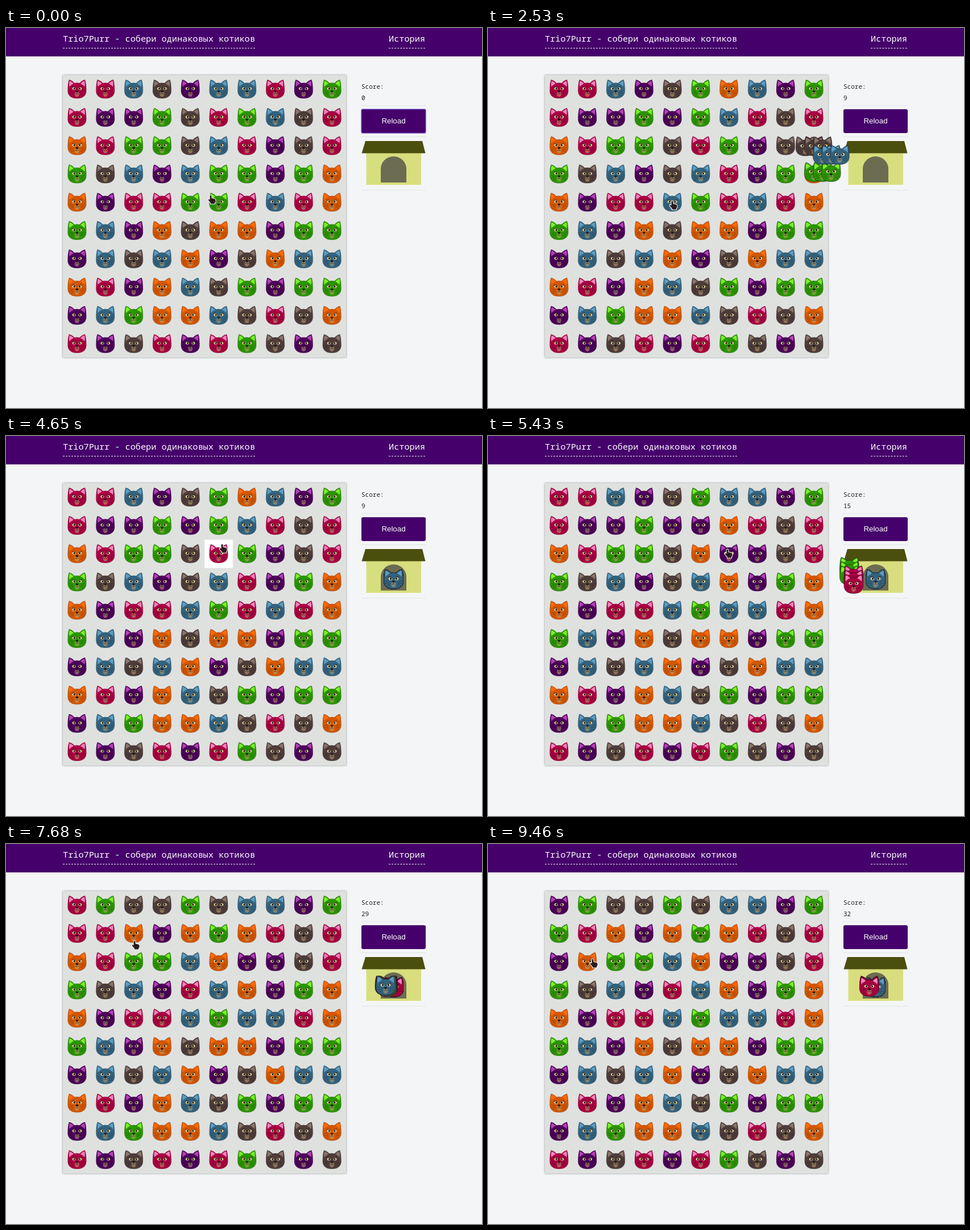
These frames come from a looping animation (837 by 669 pixels, 9560 ms). An HTML page with a canvas:

```html
<!DOCTYPE html>
<html lang="ru">
<head>
<meta charset="utf-8">
<title>Котики</title>
<style>
  html, body { margin: 0; width: 100%; height: 100%; overflow: hidden; background: #f4f5f7; }
  #stage { position: relative; width: 837px; height: 669px; overflow: hidden; }
  #stage > * { position: absolute; }
  .bar { left: 0; top: 0; width: 837px; height: 50px; background: #45006b; }
  .link { top: 8px; height: 27px; font: 15.23px/20px "Noto Sans Mono", monospace; color: #fff; white-space: pre; border-bottom: 1px dashed #fff; }
  .board { left: 100px; top: 83px; width: 498px; height: 497px; background: #dfe1df; box-shadow: 0 0 3px rgba(0, 0, 0, .45); }
  .score { left: 625px; top: 93px; font: 11px/20px "Noto Sans Mono", monospace; color: #222; }
  .rule { left: 625px; width: 113px; height: 1px; background: #e2e3e6; }
  .reload { left: 625px; top: 143px; width: 113px; height: 42px; border-radius: 3px; background: #45006b; color: #fff; font: 13.33px/42px "Liberation Sans", Arial, sans-serif; text-align: center; }
  .reload.focus { box-shadow: inset 0 0 0 1px #5a2c9c, 0 0 0 1px #9a86d8; }
  svg, canvas { left: 0; top: 0; }
</style>
</head>
<body>
<div id="stage">
  <div class="bar"></div>
  <div class="link" style="left:100px">Trio7Purr - собери одинаковых котиков</div>
  <div class="link" style="right:100px">История</div>
  <div class="board"></div>
  <div class="score">Score:<br><span id="score">0</span></div>
  <div class="rule" style="top:136px"></div>
  <div class="reload" id="reload">Reload</div>
  <div class="rule" style="top:191px"></div>
  <div class="rule" style="top:285px"></div>
  <svg width="837" height="669">
    <path fill="#d8de7d" d="M633.500 220H730V276H633.500Z"/>
    <path fill="#4b4f0d" d="M632 199H732L737.500 220.500H625.500Z"/>
    <path fill="#6c6c52" d="M659 272V248A22.500 22 0 0 1 704 248V272Z"/>
  </svg>
  <canvas id="view" width="837" height="669"></canvas>
</div>
<script>
const LOOP = 9560, FLIGHT = 490, CELL = 49.8;
const HOME = { x: 681.5, y: 252 };
const ctx = document.getElementById('view').getContext('2d');
const scoreEl = document.getElementById('score');
const reloadEl = document.getElementById('reload');

// fur and inner ear
const COATS = {
  R: ['#a80040', '#f283bd'], B: ['#33627d', '#5c9dc2'],
  K: ['#4d3c3a', '#887469'], P: ['#4b0058', '#b440b6'],
  G: ['#2b9404', '#7cf02a'], O: ['#d25603', '#ff6c08']
};

const START = [
  'RRBKPBBRPG', 'RPPGKRGBKR', 'ORGGKBRPKR', 'GKBPBGGPGO', 'OPRRGGRBRO',
  'GBPOKOOPGG', 'PBKBOPKOBB', 'ORPOBKGPGG', 'PBGOOBKRKO', 'RPKRPRGKPK'
];

// cols: new tops of columns; fly: coat, row, column of each matched cat
const MOVES = [
  { at: 2330, score: 9, cols: { 3: 'P', 4: 'KPKKB', 5: 'GGRB', 6: 'OBGR', 7: 'BR' },
    fly: 'G34 G35 G36 K03 K04 K05 B15 B16 B17' },
  { at: 5160, score: 15, cols: { 5: 'GPO', 6: 'BOPOB' },
    fly: 'G05 G15 G25 R26 R36 R46' },
  { at: 7300, score: 29, cols: { 1: 'GR', 2: 'KO', 3: 'KP', 4: 'GOBR', 5: 'KG' },
    fly: 'P11 P12 P13 P14 P15 K14 K24 K34 G13 B12' },
  { at: 9060, score: 32, cols: { 0: 'PGP', 1: 'GRO' }, fly: 'R00 R10 R20' }
];

// from, to, row, column
const PICKS = [[1760, 2330, 3, 4], [4650, 5160, 2, 5], [6800, 7300, 0, 3], [8380, 9060, 2, 0]];

// time, x, y
const POINTER = [
  [0, 355, 294], [820, 355, 294], [1000, 314, 260], [1180, 322, 264], [1760, 322, 264],
  [1960, 320, 304], [3280, 318, 304], [3420, 457, 276], [3650, 463, 255], [3790, 463, 255],
  [4300, 375, 175], [4430, 375, 190], [4650, 375, 190], [4970, 416, 199], [6110, 416, 199],
  [6590, 247, 110], [6660, 243, 104], [6800, 270, 98], [6870, 270, 98], [7050, 268, 148],
  [7310, 268, 148], [7680, 221, 170], [8100, 136, 205], [8380, 136, 205], [8840, 179, 202],
  [LOOP, 179, 202]
];

const HEAD = new Path2D('M-14-16.300C-9.500-15.500-6.500-12.500-4.500-10.500Q0-11.500 4.500-10.500C6.500-12.500 9.500-15.500 14-16.300C16-11 16-5 16.300 1C17 10.500 12 16.500 0 16.500S-17 10.500-16.300 1C-16-5-16-11-14-16.300Z');
const EAR = new Path2D('M-13-14.500C-10-13.500-7.500-11.500-6-9.500C-8.500-8.500-11.500-6.500-13.300-4C-14.300-8-14-12-13-14.500Z');
const WHISKERS = new Path2D('M-7 5L-14 3M-7 7L-14 7.500M-6.500 9L-12 11.500M7 5L14 3M7 7L14 7.500M6.500 9L12 11.500');
const BROWS = new Path2D('M-9-3.500Q-5-5-2.300-1.500M9-3.500Q5-5 2.300-1.500');
const MOUTH = new Path2D('M0 5V7.500M-3 8.500Q-1 9.500 0 7.500Q1 9.500 3 8.500');
const HAND = new Path2D('M3.500 1.800Q3.500.5 5 .5T6.500 1.800V5.500L11.500 6.800Q13.500 7.300 13.500 9V11.500L12 14V15.500H5V14L1 9.500Q0 7.500 1.500 7.200L3.500 8.500Z');

const centre = (row, col) => ({ x: 100 + (col + .5) * CELL, y: 83 + (row + .5) * CELL - .5 });

function bezier(x1, y1, x2, y2) {
  const axis = (a, b, s) => 3 * a * s * (1 - s) ** 2 + 3 * b * s * s * (1 - s) + s ** 3;
  return u => {
    let lo = 0, hi = 1;
    for (let i = 0; i < 20; i++) {
      const mid = (lo + hi) / 2;
      if (axis(x1, x2, mid) < u) lo = mid; else hi = mid;
    }
    return axis(y1, y2, lo);
  };
}
const ease = bezier(.25, .1, .25, 1);

function oval(x, y, rx, ry, fill) {
  ctx.fillStyle = fill;
  ctx.beginPath();
  ctx.ellipse(x, y, rx, ry, 0, 0, 7);
  ctx.fill();
}

function line(path, color, width) {
  ctx.strokeStyle = color;
  ctx.lineWidth = width;
  ctx.stroke(path);
}

function cat(coat, x, y, scale = 1, outlined = false) {
  const [fur, ear] = COATS[coat];
  ctx.save();
  ctx.translate(x, y);
  ctx.scale(scale, scale);
  ctx.fillStyle = fur;
  ctx.fill(HEAD);
  line(HEAD, outlined ? 'rgba(30,20,30,.6)' : 'rgba(0,0,0,.16)', .9);
  ctx.fillStyle = ear;
  ctx.fill(EAR);
  ctx.scale(-1, 1);
  ctx.fill(EAR);
  line(WHISKERS, 'rgba(0,0,0,.32)', .7);
  oval(0, 9, 4, 4.8, 'rgba(190,165,115,.55)');
  for (const side of [-1, 1]) {
    oval(side * 5.3, -.8, 3, 2.5, '#e5dba2');
    oval(side * 4.8, -.7, 1.5, 1.7, '#1a1209');
  }
  line(BROWS, 'rgba(15,8,10,.65)', 1);
  oval(0, 4.2, 2.3, 1.6, '#1c1414');
  line(MOUTH, 'rgba(25,15,15,.7)', .8);
  ctx.restore();
}

function boardAfter(moves) {
  const grid = START.map(row => [...row]);
  for (const { cols } of moves)
    for (const col in cols) [...cols[col]].forEach((coat, row) => grid[row][col] = coat);
  return grid;
}

function drawFlights(move, t) {
  const k = ease(Math.min(1, (t - move.at) / FLIGHT));
  for (const [coat, row, col] of move.fly.split(' ')) {
    const from = centre(+row, +col);
    cat(coat, from.x + (HOME.x - from.x) * k, from.y + (HOME.y - from.y) * k, 1 + .04 * k, true);
  }
}

function drawPointer(t) {
  const i = POINTER.findIndex(p => p[0] > t);
  const [t0, x0, y0] = POINTER[i - 1], [t1, x1, y1] = POINTER[i];
  const k = (t - t0) / (t1 - t0);
  ctx.save();
  ctx.translate(Math.round(x0 + (x1 - x0) * k), Math.round(y0 + (y1 - y0) * k));
  line(HAND, '#fff', 2);
  ctx.fillStyle = '#2a1c1c';
  ctx.fill(HAND);
  ctx.restore();
}

function draw(t) {
  const done = MOVES.filter(m => t >= m.at);
  ctx.clearRect(0, 0, 837, 669);
  ctx.fillStyle = '#fff';
  for (const [from, to, row, col] of PICKS)
    if (t >= from && t < to) ctx.fillRect(100 + col * CELL, 83 + row * CELL, CELL, CELL);
  boardAfter(done).forEach((cells, row) => cells.forEach((coat, col) => {
    const { x, y } = centre(row, col);
    cat(coat, x, y);
  }));
  for (const move of done) drawFlights(move, t);
  drawPointer(t);
  scoreEl.textContent = done.length ? done[done.length - 1].score : 0;
  reloadEl.classList.toggle('focus', t < 1760);
}

const begin = performance.now();
function tick() {
  draw((performance.now() - begin) % LOOP);
  requestAnimationFrame(tick);
}
tick();
</script>
</body>
</html>
```
